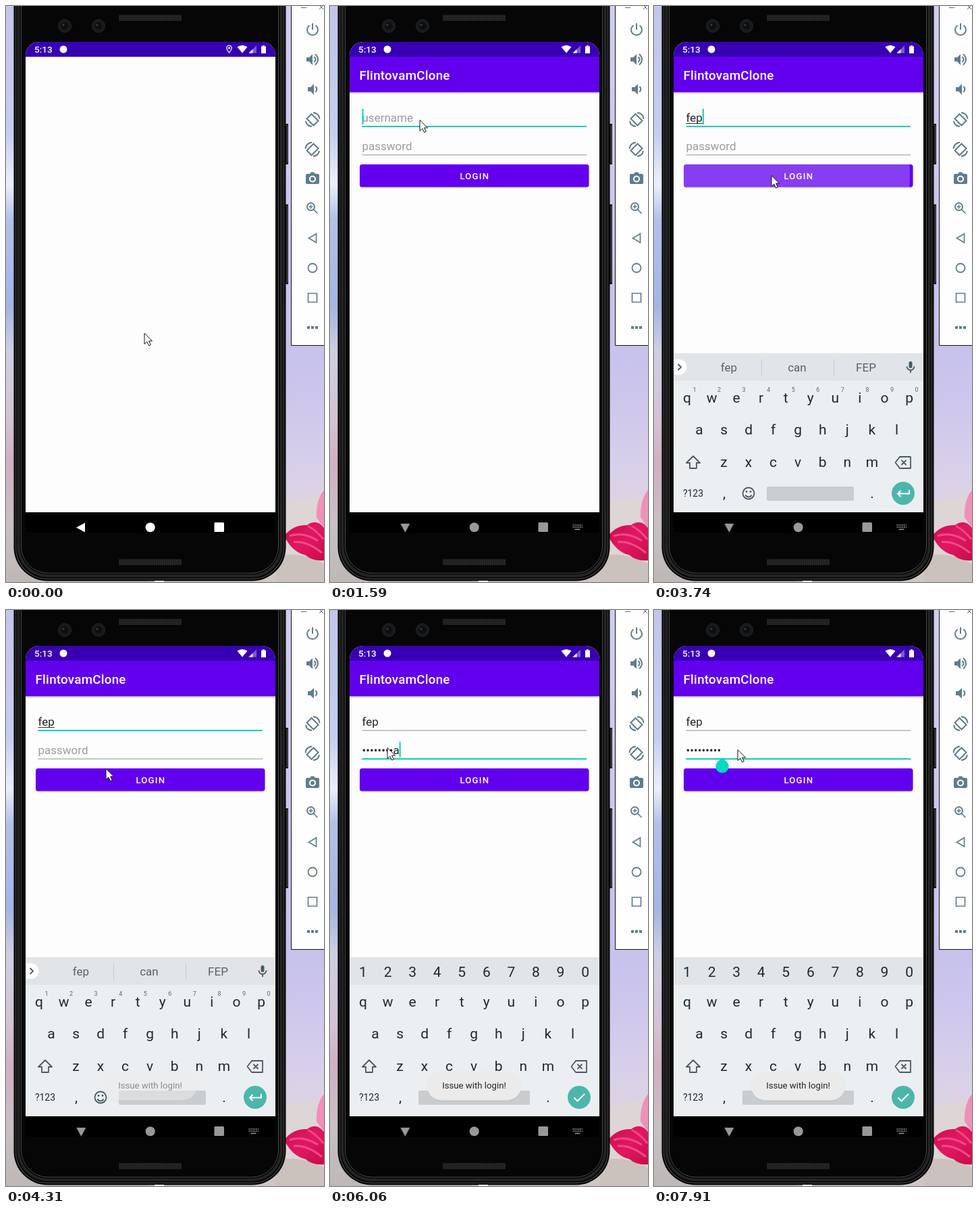
Write an HTML page that moves like this. It is 471 by 851 pixels and loops after 8000 ms.

```html
<!DOCTYPE html>
<html lang="en">
<head>
<meta charset="utf-8">
<title>Login screen</title>
<style>
html, body { margin: 0; width: 100%; height: 100%; overflow: hidden; }
svg { display: block; width: 100vw; height: 100vh; }
text { font-family: Roboto, sans-serif; }
.medium { font-weight: 500; }
.field { font-size: 17px; fill: #252525; white-space: pre; }
.hint { fill: #9b9b9b; }
.key { font-size: 21px; fill: #1b2b33; text-anchor: middle; }
.small { font-size: 9px; fill: #5b676d; text-anchor: middle; }
.word { font-size: 17px; fill: #56636a; text-anchor: middle; }
.line { fill: none; stroke: #4a5a62; stroke-width: 1.8; stroke-linejoin: round; }
.tool { fill: none; stroke: #607d8b; stroke-width: 2; }
.solid { fill: #607d8b; stroke: none; }

/* One percent is 80 ms; every state is held until the next. */
.loop { animation: 8s step-end infinite; }
#mouse { animation-name: mouse; }
#content { animation-name: content; }
#pin { animation-name: pin; }
#nav { animation-name: nav; }
#back { animation-name: back; transform-origin: 111.3px 770.5px; }
#imeIcon { animation-name: imeIcon; }
#keyboard { animation-name: keyboard; }
#ripple { animation-name: ripple; }
#toast { animation-name: toast; }
#handle { animation-name: handle; }
#userFocus { animation-name: userFocus; }
#passFocus, #passKeys { animation-name: passMode; }
#textKeys { animation-name: textMode; }

@keyframes mouse {
  0% { transform: translate(205px, 483px); }
  5.3% { transform: translate(201px, 450px); }
  7% { transform: translate(191px, 383px); }
  8.8% { transform: translate(174px, 294px); }
  10.5% { transform: translate(154px, 221px); }
  12.2% { transform: translate(139px, 181px); }
  14%, 36.7% { transform: translate(133px, 168px); }
  38.4% { transform: translate(136px, 180px); }
  40% { transform: translate(147px, 206px); }
  41.7% { transform: translate(162px, 234px); }
  43.4% { transform: translate(172px, 248px); }
  45%, 50.1% { transform: translate(174px, 250px); }
  51.8% { transform: translate(168px, 246px); }
  53.5% { transform: translate(148px, 234px); }
  55.3% { transform: translate(118px, 218px); }
  57% { transform: translate(98px, 208px); }
  58.8% { transform: translate(87px, 204px); }
  60.5%, 77.6% { transform: translate(85px, 203px); }
  79.4% { transform: translate(105px, 216px); }
  81.2% { transform: translate(140px, 241px); }
  83% { transform: translate(152px, 249px); }
  92% { transform: translate(137px, 226px); }
  93.5%, 100% { transform: translate(124px, 206px); }
}
@keyframes content { 0% { opacity: 0; } 1.85%, 100% { opacity: 1; } }
@keyframes pin { 0% { opacity: 1; } 5.3%, 100% { opacity: 0; } }
@keyframes nav { 0% { fill: #fff; } 5.3%, 100% { fill: #999; } }
@keyframes back {
  0% { transform: rotate(0); }
  17.9% { transform: rotate(-45deg); }
  19.8%, 100% { transform: rotate(-90deg); }
}
@keyframes imeIcon { 0% { opacity: 0; } 17.9%, 100% { opacity: 1; } }
@keyframes keyboard {
  0% { transform: translateY(240px); }
  21.7% { transform: translateY(130px); }
  23.6% { transform: translateY(35px); }
  25.45%, 100% { transform: none; }
}
@keyframes ripple {
  0% { opacity: 0; r: 0; }
  45% { opacity: .24; r: 110px; }
  46.7% { opacity: .24; r: 204px; }
  48.3% { opacity: .24; r: 400px; }
  50.1% { opacity: .1; r: 400px; }
  51.8% { opacity: 0; r: 0; }
  83% { opacity: .18; r: 120px; }
  84.8% { opacity: .18; r: 400px; }
  86.7% { opacity: .08; r: 400px; }
  88.5%, 100% { opacity: 0; r: 0; }
}
@keyframes toast {
  0% { opacity: 0; }
  53.5% { opacity: .5; }
  55.3% { opacity: 1; }
  79.4% { opacity: .5; }
  81.2% { opacity: 0; }
  90.3% { opacity: .15; }
  92% { opacity: .6; }
  93.5%, 100% { opacity: 1; }
}
@keyframes handle { 0% { opacity: 0; } 97% { opacity: .5; } 98.8%, 100% { opacity: 1; } }
@keyframes userFocus { 0% { opacity: 0; } 16% { opacity: 1; } 63.8%, 100% { opacity: 0; } }
@keyframes passMode { 0% { opacity: 0; } 63.8%, 100% { opacity: 1; } }
@keyframes textMode { 0% { opacity: 1; } 63.8%, 100% { opacity: 0; } }
</style>
</head>
<body>
<svg viewBox="0 0 471 851" preserveAspectRatio="none">
  <defs>
    <linearGradient id="skyLeft" x2="0" y2="1">
      <stop offset="0" stop-color="#c3c6ea"/><stop offset=".22" stop-color="#c5cdf0"/>
      <stop offset=".31" stop-color="#eceffa"/><stop offset=".37" stop-color="#b3c1ea"/>
      <stop offset=".52" stop-color="#a4b5e3"/><stop offset=".6" stop-color="#cfcfe2"/>
      <stop offset=".72" stop-color="#d3c3d2"/><stop offset=".79" stop-color="#d0b0c4"/>
      <stop offset=".9" stop-color="#c9c0c4"/><stop offset="1" stop-color="#bdb8b6"/>
    </linearGradient>
    <linearGradient id="skyRight" x2="0" y2="1">
      <stop offset="0" stop-color="#cfcdf0"/><stop offset=".58" stop-color="#c6c2ec"/>
      <stop offset=".68" stop-color="#cdc6ec"/><stop offset=".8" stop-color="#d8d0ea"/>
      <stop offset=".86" stop-color="#dbd3e2"/><stop offset="1" stop-color="#cfc6c2"/>
    </linearGradient>
    <linearGradient id="petal" x2="1" y2="1">
      <stop offset="0" stop-color="#c80f4c"/><stop offset=".5" stop-color="#e21762"/>
      <stop offset="1" stop-color="#c70d4b"/>
    </linearGradient>
    <pattern id="mesh" width="3" height="3" patternUnits="userSpaceOnUse">
      <path d="M0 0h3v3h-3z" fill="#1c1c1c"/><path d="M0 0h1.5v1.5h-1.5z" fill="#343434"/>
    </pattern>
    <clipPath id="screen"><path d="M29 748V73a20 20 0 0 1 20-20H379a20 20 0 0 1 20 20V748z"/></clipPath>
    <clipPath id="button"><rect x="44" y="234" width="339.5" height="33.5" rx="3.5"/></clipPath>
  </defs>

  <!-- Wallpaper -->
  <path d="M0 0h210v851H0z" fill="url(#skyLeft)"/>
  <path d="M210 0h261v851H210z" fill="url(#skyRight)"/>
  <path d="M400 737Q440 728 471 722V851H400z" fill="#ddd5d6"/>
  <path d="M400 812Q440 806 471 824V851H400z" fill="#cbc2bd"/>
  <path d="M471 715Q459 730 460 756L471 770z" fill="#f08fb8"/>
  <path d="M412 783Q425 766 446 767Q460 757 471 771V819Q455 821 443 811Q424 807 412 783z" fill="url(#petal)"/>
  <path d="M420 783Q440 776 462 790M426 792Q446 790 468 808M447 768Q460 775 470 788" fill="none" stroke="#ef4b86" stroke-width="3"/>

  <!-- Phone body -->
  <path d="M413 174h5v60h-5zM413 293h5v118h-5z" fill="#151515"/>
  <path d="M416.5 176v56M416.5 295v114" stroke="#5a5a5a"/>
  <rect x="11.5" y="-60" width="403" height="909.5" rx="50" fill="#050505"/>
  <g fill="none">
    <rect x="14.5" y="-60" width="397" height="906.5" rx="47" stroke="#3a3a3a" stroke-width="1.5"/>
    <rect x="18.5" y="-60" width="389" height="902" rx="44" stroke="#242424" stroke-width="4"/>
    <rect x="22.5" y="-60" width="381" height="898" rx="40" stroke="#4a4a4a"/>
  </g>
  <rect x="24" y="-60" width="378" height="896" rx="38" fill="#060606"/>
  <path d="M220 849h14v2h-14z" fill="#eee"/>
  <rect x="167" y="13" width="93" height="9" rx="1.5" fill="url(#mesh)"/>
  <rect x="167" y="817" width="93" height="9" rx="1.5" fill="url(#mesh)"/>
  <g id="lenses"></g>

  <!-- Screen -->
  <g clip-path="url(#screen)">
    <path d="M29 53h370v695H29z" fill="#fdfdfd"/>
    <path d="M29 53h370v22H29z" fill="#3700b3"/>
    <g fill="#fff">
      <text class="medium" x="42" y="69" font-size="13.5">5:13</text>
      <circle cx="85" cy="64" r="5.5"/>
      <path id="pin" class="loop" fill-rule="evenodd" d="M330.500 70q-4.300-5.500-4.300-8a4.300 4.300 0 0 1 8.600 0q0 2.500-4.300 8zm0-2q3-4 3-6a3 3 0 0 0-6 0q0 2 3 6zm0-7.600a1.500 1.500 0 1 1 0 3a1.500 1.500 0 0 1 0-3z"/>
      <path d="M342.500 60.500q7.500-5 15 0l-7.500 9z"/>
      <path d="M371 58.500v11h-11.500z" opacity=".35"/><path d="M365.500 64v5.500h-6z"/>
      <path d="M380 58.200h2.800v1.300h2.200v10.500h-7v-10.500h2z"/>
    </g>
    <g id="content" class="loop">
      <path d="M29 127h370v3H29z" fill="#000" opacity=".1"/>
      <path d="M29 75h370v52.500H29z" fill="#6200ee"/>
      <text class="medium" x="43.500" y="109" font-size="18.800" letter-spacing=".0125em" fill="#fff">FlintovamClone</text>

      <path d="M47.500 177.500h332.500v1H47.500zM47.500 219.500h332.500v1H47.500z" fill="#929292"/>
      <path id="userFocus" class="loop" d="M47.500 177h332.500v2H47.500z" fill="#03d0bd"/>
      <path id="passFocus" class="loop" d="M47.500 219h332.500v2H47.500z" fill="#03d0bd"/>
      <text id="user" class="field" x="47.500" y="170.500"></text>
      <rect id="composing" x="47.500" y="173" height="1" fill="#333"/>
      <text id="pass" class="field" x="47.500" y="213"></text>
      <rect id="caret" width="2" height="23" fill="#03d0bd"/>

      <rect x="44" y="235.500" width="339.500" height="33.500" rx="4" fill="#000" opacity=".14"/>
      <g clip-path="url(#button)">
        <path d="M44 234h340v34H44z" fill="#6200ee"/>
        <circle id="ripple" class="loop" cx="175" cy="251" fill="#fff"/>
      </g>
      <text class="medium" x="214.300" y="256" font-size="13.200" letter-spacing=".0892em" text-anchor="middle" fill="#fff">LOGIN</text>
      <path id="handle" class="loop" d="M101 218l6.900 6.300a9.700 9.700 0 1 1-13.800 0z" fill="#03d9c5"/>
    </g>

    <g id="keyboard" class="loop">
      <path d="M29 513h370v235H29z" fill="#ebeff1"/>
      <path d="M29 513h370v41H29z" fill="#e1e5e8"/>
      <g id="letters"></g>
      <g class="line">
        <path d="M58 665l10 10h-5v8h-10v-8h-5z"/>
        <path d="M364 666h16v17h-16l-6.500-8.500zM366.500 671l7 7M373.500 671l-7 7"/>
      </g>
      <text class="key" x="58" y="725" style="font-size:14px">?123</text>
      <text class="key" x="104" y="727">,</text>
      <text class="key" x="323" y="727">.</text>
      <rect x="167" y="710" width="129" height="21" rx="2" fill="#c9cdd0"/>
      <circle cx="369" cy="720" r="17" fill="#4db6ac"/>
      <g id="textKeys" class="loop">
        <path d="M28 522h9a11 11 0 0 1 0 23h-9z" fill="#fff"/>
        <path class="line" d="M35.500 529l4.500 4.500-4.500 4.500"/>
        <path d="M159.500 522v24M266.500 522v24" stroke="#c3c9cd"/>
        <g id="words"></g>
        <rect x="377.500" y="525" width="5" height="10" rx="2.500" fill="#4a5a62"/>
        <path class="line" d="M374.500 532.500a5.500 5.500 0 0 0 11 0M380 538v4" stroke-width="1.500"/>
        <g class="line"><circle cx="140" cy="720" r="8.500"/><path d="M135.500 722.500a5 5 0 0 0 9 0"/></g>
        <circle cx="137" cy="717.500" r="1.400" fill="#4a5a62"/><circle cx="143" cy="717.500" r="1.400" fill="#4a5a62"/>
        <path d="M378 715v5.500h-17M365.500 716l-4.500 4.500 4.500 4.500" fill="none" stroke="#fff" stroke-width="2"/>
      </g>
      <g id="passKeys" class="loop">
        <path d="M29 513h370v41H29z" fill="#e1e5e8"/>
        <rect x="131" y="710" width="165" height="21" rx="2" fill="#c9cdd0"/>
        <g id="digits"></g>
        <path d="M361.500 720.500l5 5 10.500-10.500" fill="none" stroke="#fff" stroke-width="2"/>
      </g>
    </g>
    <g id="toast" class="loop">
      <rect x="143.500" y="682" width="140" height="44" rx="22" fill="#000" opacity=".06"/>
      <rect x="143.500" y="681" width="140" height="43.500" rx="21.700" fill="#ebebeb"/>
      <text x="213.500" y="707" font-size="13.200" text-anchor="middle" fill="#252525">Issue with login!</text>
    </g>
  </g>

  <path d="M29 748h370v30H29z" fill="#000"/>
  <g id="nav" class="loop">
    <path id="back" class="loop" d="M117 763.500v14l-13-7z"/>
    <circle cx="213.700" cy="770.300" r="7"/>
    <rect x="308.500" y="763" width="14.500" height="14" rx="1.500"/>
  </g>
  <g id="imeIcon" class="loop" fill="none" stroke="#888" stroke-width="1.700" stroke-dasharray="1.700 1">
    <path d="M359.500 766.800h14.500M359.500 769.800h14.500"/><path d="M362.500 773.300h8" stroke-dasharray="none"/>
  </g>

  <!-- Emulator tool bar -->
  <path d="M422.500 -2V501.500H474V-2z" fill="#fefefe" stroke="#111"/>
  <path d="M437 2.500h8M464 -1l6 6M470 -1l-6 6" stroke="#666" fill="none"/>
  <g class="tool">
    <path d="M449.500 28.500a8 8 0 1 0 9 0M454 25.500v9.500"/>
    <path class="solid" d="M445 76h4l5-5v16l-5-5h-4zM447 120h4l5-5v16l-5-5h-4z"/>
    <path d="M456.500 75q4 4 0 8M458 71q8 8 0 16M458.500 119q3.500 4 0 8"/>
    <g id="turn">
      <path d="M445.500 166.500l7-7 10 10-7 7z"/>
      <path d="M455 157.500q8.500 1 9.500 9.500M453 178q-8-1-9-8"/>
    </g>
    <use href="#turn" transform="translate(908 44) scale(-1 1)"/>
    <path class="solid" fill-rule="evenodd" d="M446 248h4l2-2.500h4l2 2.500h4q2 0 2 2v11q0 2-2 2h-16q-2 0-2-2v-11q0-2 2-2zm8 2.500a5 5 0 1 0 .01 0z"/>
    <circle class="solid" cx="454" cy="255.500" r="3"/>
    <circle cx="451.500" cy="296.500" r="5.500"/><path d="M455.500 300.500l6 6M448.500 296.500h6M451.500 293.500v6" stroke-width="1.700"/>
    <path d="M459.500 336.500v13l-11-6.500z" stroke-width="1.700"/>
    <circle cx="454" cy="387" r="6.500" stroke-width="1.800"/>
    <path d="M447.500 424.500h13v13h-13z" stroke-width="1.700"/>
    <path class="solid" d="M446 473h4v4h-4zM452 473h4v4h-4zM458 473h4v4h-4z"/>
  </g>

  <path id="mouse" class="loop" d="M0 .5v16l3.800-3.500 2.800 5.800 2.700-1.200-2.700-5.600h5z" fill="#fff" stroke="#111" stroke-linejoin="round"/>
</svg>
<script>
const LOOP = 8000;
const $ = id => document.getElementById(id);

function add(parent, tag, attrs, label = '') {
  const node = document.createElementNS('http://www.w3.org/2000/svg', tag);
  for (const name in attrs) node.setAttribute(name, attrs[name]);
  node.textContent = label;
  parent.append(node);
  return node;
}

function keyRow(parent, labels, x, y, kind = 'key') {
  [...labels].forEach((label, i) => add(parent, 'text', { class: kind, x: x + i * 36.56, y }, label));
}

for (const cx of [87, 137]) {
  add($('lenses'), 'circle', { cx, cy: 29.5, r: 9.5, fill: '#17191b', stroke: '#25282a' });
  add($('lenses'), 'circle', { cx, cy: 29.5, r: 5, fill: '#0b0d10' });
  add($('lenses'), 'circle', { cx: cx - 2, cy: 28, r: 1.6, fill: '#3a4045' });
}
keyRow($('letters'), 'qwertyuiop', 49, 586);
keyRow($('textKeys'), '1234567890', 60, 570, 'small');
keyRow($('letters'), 'asdfghjkl', 67, 633);
keyRow($('letters'), 'zxcvbnm', 103.5, 681);
keyRow($('digits'), '1234567890', 49, 542);
const words = [111, 212, 314].map(x => add($('words'), 'text', { class: 'word', x, y: 540 }));

// The picture changes in bursts: first time, last time, number of steps.
const bursts = [[150, 1120, 8], [1280, 2040, 6], [2320, 2470, 2], [2940, 3870, 8], [4010, 4980, 8],
  [5110, 6060, 8], [6210, 7230, 8], [7360, 7480, 2], [7760, 7910, 2]];
const beats = bursts.flatMap(([from, to, n]) =>
  Array.from({ length: n }, (_, i) => from + (to - from) * i / (n - 1) - 5));

const at = (t, track) => track.reduce((value, [time, next]) => t >= time ? next : value, track[0][1]);

const name = 'fep';
const secret = 'kfmwdsrja';
const nameCount = [[0, 0], [2310, 2], [2460, 3]];
const secretCount = [[0, 0], [5360, 1], [5500, 3], [5635, 4], [5770, 6], [5910, 7], [6050, 9]];
const suggestions = [[0, ['I', 'the', 'and']], [2310, ['fe', 'few', 'FE']], [2460, [name, 'can', 'FEP']]];
const blinkStart = [[0, 1430], [2310, 2460], [5100, 5100], [5360, 5960]];

function setField(node, value, hint) {
  node.textContent = value || hint;
  node.classList.toggle('hint', !value);
  return value ? node.getComputedTextLength() : 0;
}

function render(time) {
  const t = beats.filter(beat => beat <= time).pop() ?? 0;
  const count = at(t, secretCount);
  const masked = '•'.repeat(Math.max(0, count - 1)) + (t < 7470 ? secret.charAt(count - 1) : '•');
  const userWidth = setField($('user'), name.slice(0, at(t, nameCount)), 'username');
  const passWidth = setField($('pass'), count ? masked : '', 'password');
  $('composing').setAttribute('width', t < 5100 ? userWidth : 0);

  const onPass = t >= 5100;
  const blink = (t - at(t, blinkStart)) / 500;
  const lit = t >= 1430 && (blink < 0 || Math.floor(blink) % 2 === 0);
  $('caret').setAttribute('x', 47.5 + (onPass ? passWidth : userWidth));
  $('caret').setAttribute('y', onPass ? 194.5 : 152);
  $('caret').setAttribute('opacity', lit ? 1 : 0);
  at(t, suggestions).forEach((word, i) => words[i].textContent = word);
}

let start;
function tick(now) {
  start ??= now;
  render((now - start) % LOOP);
  requestAnimationFrame(tick);
}
render(0);
requestAnimationFrame(tick);
</script>
</body>
</html>
```
